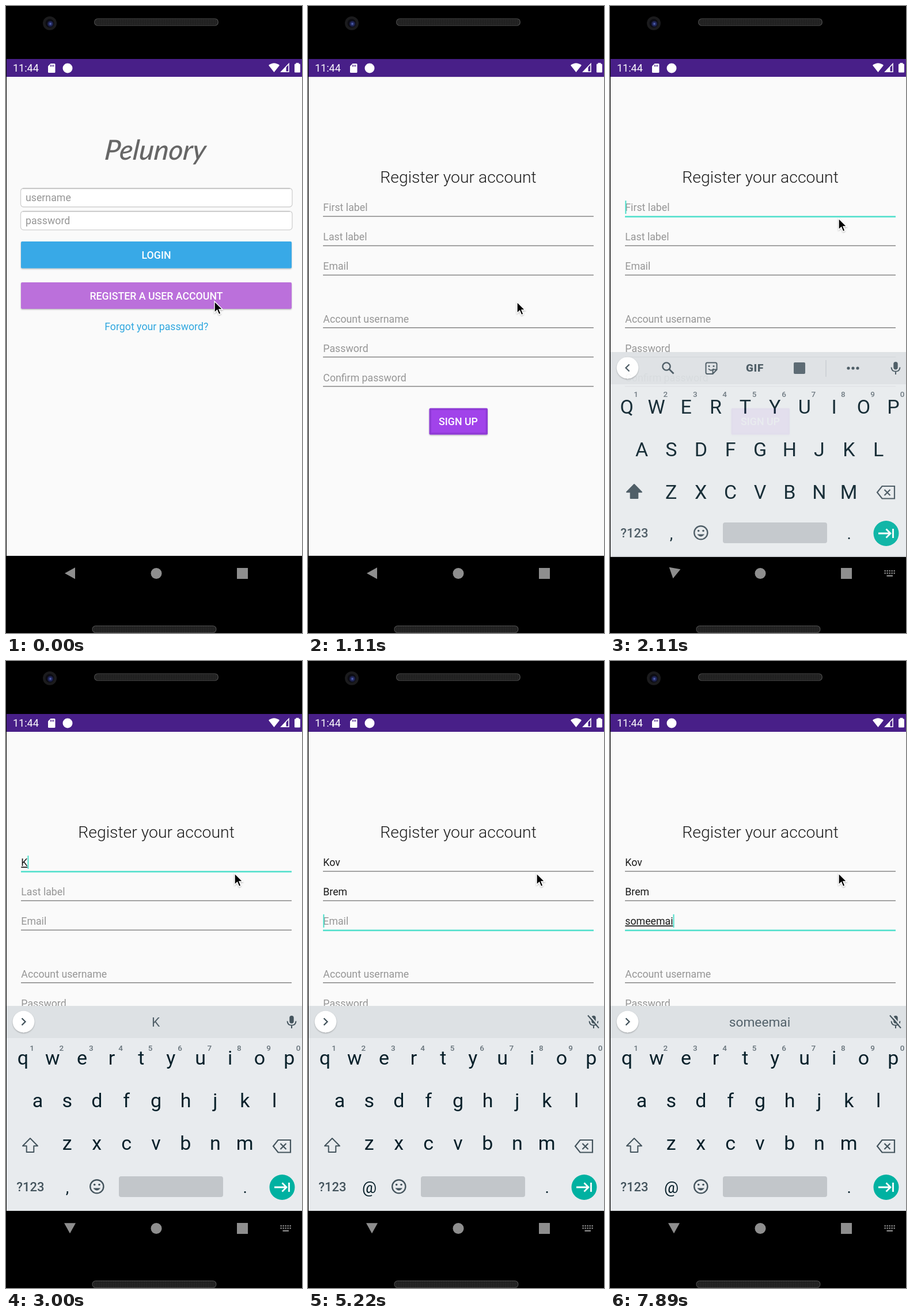
These frames come from a looping animation (514x1089 px, 8000 ms). An HTML page:

```html
<!DOCTYPE html>
<html lang="en">
<head>
<meta charset="utf-8">
<title>Sign-up flow</title>
<style>
html, body { margin: 0; width: 100%; height: 100%; overflow: hidden; background: #000; }
svg { display: block; width: 100vw; height: 100vh; }
text { font-family: Roboto, "Noto Sans", sans-serif; font-size: 17.75px; white-space: pre; }
.mid { text-anchor: middle; }
.btn { fill: #fff; font-weight: 500; text-anchor: middle; }
.hint { fill: #969696; }
.key { font-size: 34px; fill: #08202a; text-anchor: middle; }
.digit { font-size: 13.5px; font-weight: 500; fill: #66727a; text-anchor: middle; }
.line { fill: none; stroke: #44545d; stroke-width: 2.4; }
.ink { fill: #44545d; }
</style>
</head>
<body>
<svg id="stage" viewBox="0 0 514 1089"></svg>
<script>
const LOOP = 8000, STEP = 1000 / 9, TEAL = '#4fdfcb';
const stage = document.getElementById('stage');

const rect = (x, y, w, h, fill, more = '') =>
  `<rect x="${x}" y="${y}" width="${w}" height="${h}" fill="${fill}" ${more}/>`;
const text = (x, y, s, cls = '', more = '') =>
  `<text x="${x}" y="${y}" class="${cls}" ${more}>${s}</text>`;
const circle = (x, y, r, fill, more = '') =>
  `<circle cx="${x}" cy="${y}" r="${r}" fill="${fill}" ${more}/>`;
const path = (d, more = '') => `<path d="${d}" ${more}/>`;

const LABELS = ['First label', 'Last label', 'Email', 'Account username', 'Password', 'Confirm password'];
const ROWS = [350.3, 401.3, 452.3, 543.7, 594.6, 645.6];

// Typed entries: time of focus, then one time per key.
const ENTRIES = [
  { focus: 1990, word: 'Kov', keys: [2880, 3220, 3430] },
  { focus: 3880, word: 'Brem', keys: [4210, 4550, 4770, 4990] },
  { focus: 5210, word: 'someemai', keys: [5660, 5990, 6330, 6550, 6990, 7220, 7550, 7770] }
];

const screenOf = body =>
  rect(1, 92, 520, 936, '#000') + rect(1, 92, 520, 31, '#481f88') + rect(1, 123, 520, 832, '#fafafa') + body;

const input = (y, s) =>
  rect(25.5, y, 471.5, 32.5, '#fff', 'rx="5" stroke="#cfcfcf" stroke-width="1.3"') +
  path(`M29 ${y + .6}H493`, 'stroke="#bdbdbd" stroke-width="1.4"') +
  text(34, y + 22.7, s, 'hint');

const button = (x, y, w, h, fill) => rect(x, y, w, h, fill, 'rx="2" filter="url(#drop)"');

const loginPage = screenOf(
  text(257, 267, 'Pelunory', 'mid',
    'fill="#666" style="font:italic 500 48px Lato,\'Noto Serif\',sans-serif" transform="translate(29 0) skewX(-6)"') +
  input(316.5, 'username') + input(356.3, 'password') +
  button(26, 409, 470, 46.5, '#38a9e7') + text(261, 439, 'LOGIN', 'btn') +
  button(26, 480, 470, 46, '#bb6fdb') +
  `<g clip-path="url(#regClip)">${circle(363, 513, 0, '#000', 'id="ripple"')}</g>` +
  text(261, 510, 'REGISTER A USER ACCOUNT', 'btn') +
  text(261.3, 563, 'Forgot your password?', 'mid', 'fill="#2fa7df"'));

const field = (label, i) =>
  text(26.3, ROWS[i] + 6, label, 'hint', `id="field${i}"`) +
  rect(26, ROWS[i] + 14.3, 470, 1.5, '#858585', `id="under${i}"`);

const signupPage = screenOf(
  text(261, 307, 'Register your account', 'mid', 'fill="#1c1c1c" style="font-size:28.4px;font-weight:300"') +
  LABELS.map(field).join('') +
  button(210.5, 698.5, 101.5, 46, '#8f3ad6') + rect(214, 702, 94.5, 39, '#a143ea') +
  text(261, 728, 'SIGN UP', 'btn') +
  rect(26.3, 0, 2, 23, TEAL, 'id="caret"'));

const statusIcons =
  text(12, 114.3, '11:44', '', 'fill="#fff" style="font-size:18px"') +
  path('M77.5 100H84Q85.5 100 85.5 101.5V114.5Q85.5 116 84 116H74.5Q73 116 73 114.5V104.5Z', 'fill="#fff"') +
  path('M77.5 102V105.5M80 102V105.5M82.5 102V105.5', 'stroke="#481f88" stroke-width="1.2"') +
  circle(107, 108, 8.5, '#fff') +
  path('M456 103Q465.5 95.5 475 103L465.5 115Z', 'fill="#fff"') +
  path('M491 100.5V114.3H478Z', 'fill="none" stroke="#fff" stroke-width="1.6"') +
  path('M486.5 105V115H477Z', 'fill="#fff"') +
  rect(501, 100.5, 10, 15, '#fff', 'rx="1.2"') + rect(503.5, 98.8, 5, 2.5, '#fff');

const letters = [
  ['QWERTYUIOP', 29.3, 706], ['ASDFGHJKL', 55, 780], ['ZXCVBNM', 106.3, 854]
].map(([row, x, y]) => [...row].map((c, i) =>
  text(x + 51.4 * i, y, c, 'key', `data-c="${c}" data-y="${y}"`)).join('')).join('');

const digits = [...'1234567890'].map((d, i) => text(45 + 51.4 * i, 677, d, 'digit')).join('');

const tools =
  `<g id="tools">` +
  `<circle cx="98" cy="624" r="6.6" class="line"/>` + path('M102.8 628.8L110.5 636.5', 'class="line" style="stroke-width:2.8"') +
  path('M169 617.5H183Q185.5 617.5 185.5 620V629.5L178.5 637H169Q166.5 637 166.5 634.5V620Q166.5 617.5 169 617.5ZM185 629.5H180.5Q178.5 629.5 178.5 631.5V636.5', 'class="line" style="stroke-width:2"') +
  circle(172, 623.5, 1.6, '#44545d') + circle(180, 623.5, 1.6, '#44545d') +
  path('M171 628Q175.5 633.5 180 628', 'class="line" style="stroke-width:1.8"') +
  text(251.5, 633.4, 'GIF', 'mid ink', 'style="font-size:19px;font-weight:900;letter-spacing:.6px"') +
  rect(319, 617, 20, 20, '#52616a', 'rx="2"') +
  rect(374.5, 613, 1, 29, '#bcc2c6') +
  [414, 422, 430].map(x => circle(x, 627, 2.6, '#44545d')).join('') + `</g>`;

const mic =
  rect(492.3, 616, 7.4, 13.5, '#44545d', 'rx="3.7"') +
  path('M488.5 625.5Q489 632.7 496 632.7T503.5 625.5M496 633V638', 'class="line" style="stroke-width:2"') +
  `<g id="micOff">` + path('M488 614L507 636', 'stroke="#dde1e4" stroke-width="2.4"') +
  path('M486 615.5L505 637.5', 'class="line" style="stroke-width:2"') + `</g>`;

const keyboard =
  rect(1, 599, 520, 356, '#e8ebee') + rect(1, 599, 520, 56, '#dde1e4') +
  circle(30.5, 626.5, 18.8, '#fff', 'filter="url(#drop)"') +
  path('', 'id="chevron" class="line" style="stroke-width:2.3"') + tools + mic +
  text(260, 635.3, '', 'mid', 'id="guess" fill="#52616a" style="font-size:22.7px"') +
  digits + letters +
  path('M42 829L55 842.3H48.3V853H35.7V842.3H29Z', 'id="shift" class="line" style="stroke-width:2" stroke-linejoin="round"') +
  path('M472.5 832H494V853.5H472.5L464 842.7ZM476.5 838L486.5 848M486.5 838L476.5 848', 'class="line" style="stroke-width:2.2"') +
  text(42.3, 921, '?123', 'mid ink', 'style="font-size:22px;font-weight:500"') +
  text(106.5, 924, ',', 'key', 'id="comma" style="font-size:28px"') +
  `<circle cx="157.8" cy="912.8" r="11.6" class="line"/>` +
  circle(153.7, 909.5, 1.8, '#44545d') + circle(162, 909.5, 1.8, '#44545d') +
  path('M151.5 915.5Q157.8 923.5 164 915.5Z', 'class="ink"') +
  rect(196, 895, 181, 36, '#c2c6ca', 'rx="4"') +
  text(415.3, 924, '.', 'key', 'style="font-size:28px"') +
  circle(479.5, 914, 22, '#00b1a1') +
  path('M466 914H486M479.5 906.5L487 914L479.5 921.5M491.5 906V922', 'fill="none" stroke="#fff" stroke-width="2.8"');

const keyDots = [0, 1].map(r => [0, 1, 2, 3, 4].map(c =>
  rect(476.5 + 4 * c, 980 + 4 * r, 2.3, 2.3, '#8e8e8e')).join('')).join('') + rect(480.5, 988.5, 10.5, 2.3, '#8e8e8e');

const nav =
  path('M-10 -9H10L0 9Z', 'id="back" fill="#8e8e8e"') + circle(261, 985.5, 9.5, '#8e8e8e') +
  rect(401, 976, 19, 19, '#8e8e8e') + `<g id="keyIcon">${keyDots}</g>`;

const speaker = (x, y) =>
  rect(x, y, 215, 12, '#1b1b1b', 'rx="6"') +
  rect(x, y, 215, 12, 'url(#mesh)', 'rx="6" stroke="#464646" stroke-width="1.2"');

const pointer = `<g id="pointer" filter="url(#drop)">` +
  path('M0 0V19.5L4.6 15.3L7.6 22.6L11 21.2L8 14H14Z', 'stroke="#fff" stroke-width="1.4"') + `</g>`;

stage.innerHTML = `<defs>
  <filter id="drop" x="-30%" y="-30%" width="160%" height="180%">
    <feDropShadow dx="0" dy="1.2" stdDeviation="1.2" flood-opacity=".3"/></filter>
  <pattern id="mesh" width="3" height="3" patternUnits="userSpaceOnUse">${rect(0, 0, 1.5, 1.5, '#393939')}</pattern>
  <radialGradient id="lens"><stop offset="0" stop-color="#6f83d8"/><stop offset=".35" stop-color="#2b3474"/>
    <stop offset="1" stop-color="#10122a"/></radialGradient>
  <clipPath id="screen">${rect(1, 92, 513, 936, '#000')}</clipPath>
  <clipPath id="regClip">${rect(26, 480, 470, 46, '#000', 'rx="2"')}</clipPath>
</defs>` + rect(0, 0, 514, 1089, '#000') +
  circle(76, 30, 12, '#1b1b1d') + circle(76, 30, 7.5, '#0c0c12') + circle(77, 31, 5.5, 'url(#lens)') +
  speaker(153.5, 22) + speaker(150, 1076.5) +
  `<g clip-path="url(#screen)"><g id="login">${loginPage}</g><g id="signup">${signupPage}</g>` +
  `<g id="keyboard">${keyboard}</g>${statusIcons}</g>` + nav + pointer;

const el = {};
stage.querySelectorAll('[id]').forEach(e => el[e.id] = e);
const keyEls = [...stage.querySelectorAll('[data-c]')];

const set = (e, attrs) => { for (const k in attrs) e.setAttribute(k, attrs[k]); };
const show = (e, on) => set(e, { visibility: on ? 'visible' : 'hidden' });
const clamp = x => Math.max(0, Math.min(1, x));
const zoom = s => `translate(261 555) scale(${s}) translate(-261 -555)`;

const TRACK = [[0, 362, 513], [670, 363, 514], [1111, 363, 514], [1333, 360, 400], [1667, 397, 369], [LOOP, 397, 369]];
function pointerAt(t) {
  const i = TRACK.findIndex(p => p[0] > t);
  const [a, b] = [TRACK[i - 1], TRACK[i]];
  const u = (t - a[0]) / (b[0] - a[0]);
  return [1, 2].map(k => a[k] + (b[k] - a[k]) * u);
}

function drawPages(t) {
  const press = clamp((t - 40) / 290);
  set(el.ripple, { r: 345 * press, opacity: .12 * (1 - clamp((t - 520) / 300)) });

  // The sign-up page grows in while the login page expands beneath it.
  const opening = t > 700;
  const p = t > 1200 ? 1 : 1 - .211 * Math.exp((778 - t) / 67);
  show(el.login, t < 1200);
  set(el.login, { transform: zoom(opening ? 1 + .05 * p : 1) });
  set(el.signup, { transform: zoom(opening ? .85 + .15 * p : 1), display: opening ? 'inline' : 'none' });
}

function drawForm(t) {
  const active = ENTRIES.filter(e => t >= e.focus).length - 1;
  const typed = ENTRIES.map(e => e.word.slice(0, e.keys.filter(k => t >= k).length));
  const focused = t >= 1880 ? Math.max(active, 0) : -1;

  LABELS.forEach((label, i) => {
    const value = typed[i] || '';
    const on = i === focused;
    const f = el['field' + i];
    f.textContent = value || label;
    f.style.fill = value ? '#1a1a1a' : on && active < 0 ? '#626262' : '#969696';
    f.style.textDecoration = value && i === active ? 'underline 1px' : 'none';
    set(el['under' + i], { fill: on ? TEAL : '#858585', height: on ? 2.6 : 1.5 });
  });

  let lit = false;
  if (active >= 0) {
    const e = ENTRIES[active];
    const last = Math.max(e.focus, ...e.keys.filter(k => t >= k));
    const width = typed[active] ? el['field' + active].getComputedTextLength() : 0;
    lit = (t - last) % 1000 < 500;
    set(el.caret, { x: 26.3 + width, y: ROWS[active] - 12.3 });
  }
  set(el.caret, { opacity: lit ? 1 : 0 });
  drawKeyboard(t, active, typed[active] || '');
}

function drawKeyboard(t, active, word) {
  const since = t - 2000;
  const up = active >= 0;
  el.keyboard.style.display = up ? '' : 'none';
  show(el.keyIcon, up);
  const turn = up ? 1 - Math.exp(-(since + 50) / 73) : 0;
  set(el.back, { transform: `translate(111 985.3) rotate(${90 - 90 * turn})` });
  if (!up) return;

  set(el.keyboard, {
    transform: `translate(0 ${56 * Math.exp(-since / 33.3)})`,
    opacity: 1 - .55 * Math.exp(-since / 54)
  });
  const email = active === 2;
  const caps = !email && !word;
  keyEls.forEach(k => {
    k.textContent = caps ? k.dataset.c : k.dataset.c.toLowerCase();
    set(k, { y: k.dataset.y - (caps ? 0 : 5) });
  });
  el.shift.style.fill = caps ? '#44545d' : 'none';
  el.tools.style.display = caps ? '' : 'none';
  el.micOff.style.display = email ? '' : 'none';
  set(el.chevron, { d: caps ? 'M33.5 620.5L27.5 626.5L33.5 632.5' : 'M27.5 620.5L33.5 626.5L27.5 632.5' });
  el.comma.textContent = email ? '@' : ',';
  el.guess.textContent = word;
}

function draw(ms) {
  // The screen refreshes nine times a second.
  const t = Math.floor((ms % LOOP + 5) / STEP) * STEP % LOOP;
  drawPages(t);
  drawForm(t);
  const [x, y] = pointerAt(t);
  set(el.pointer, { transform: `translate(${x} ${y})` });
}

const start = performance.now();
function tick() {
  draw(performance.now() - start);
  requestAnimationFrame(tick);
}
tick();
</script>
</body>
</html>
```
